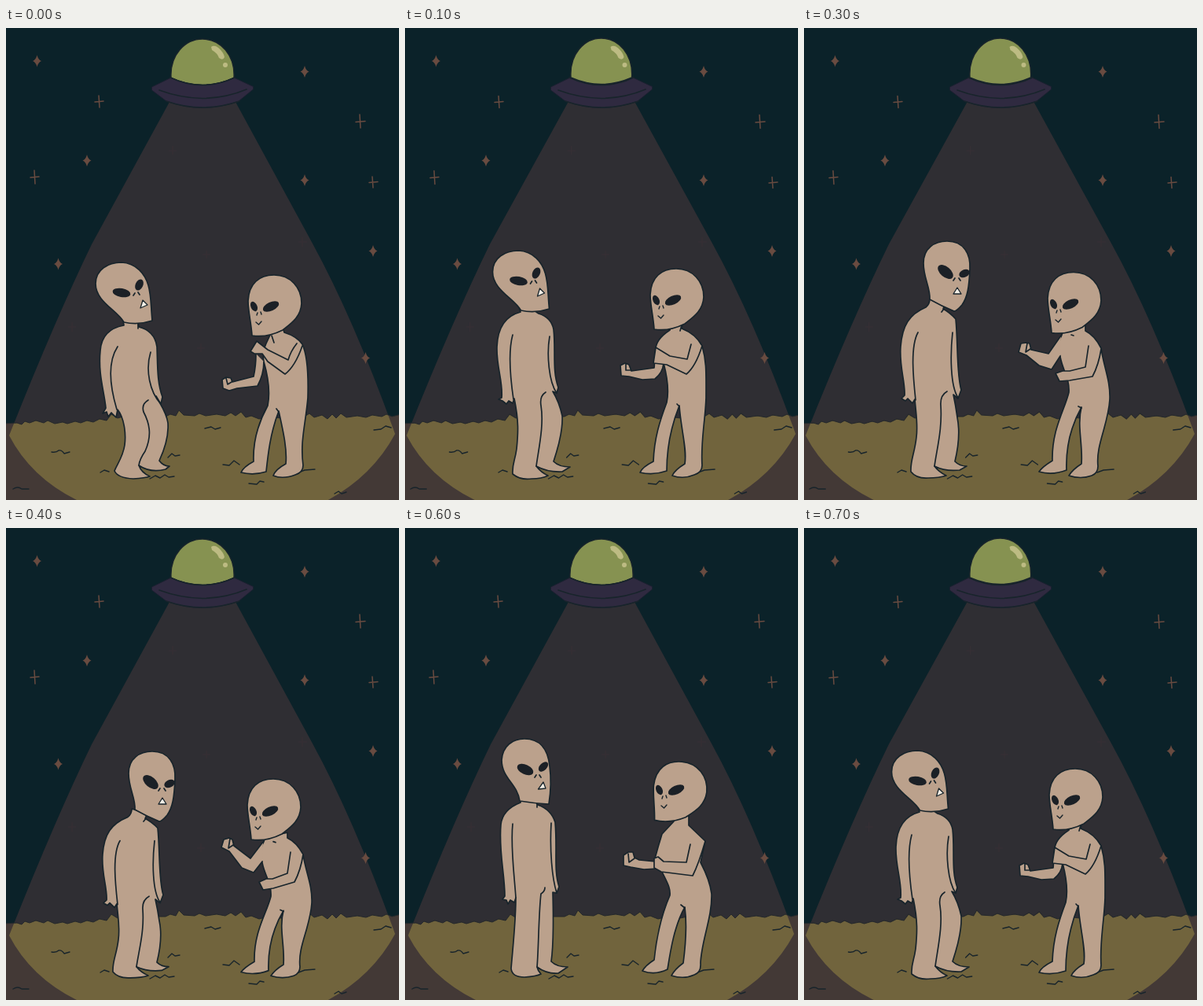
These frames come from a looping animation (500 px wide and 600 px high, 0.8 s). An HTML page:

```html
<!DOCTYPE html>
<html lang="en">
<head>
<meta charset="utf-8">
<title>Dancing aliens</title>
<style>
  html, body { margin: 0; width: 100%; height: 100%; overflow: hidden; background: #0b2229; }
  svg { display: block; width: 100%; height: 100%; }
  .line { fill: none; stroke: #18242b; stroke-width: 1.7; stroke-linecap: round; stroke-linejoin: round; }
  .skin { fill: #bba18c; stroke: #18242b; stroke-width: 1.7; stroke-linecap: round; stroke-linejoin: round; }
  .skin, .line { vector-effect: non-scaling-stroke; }
  .thin { stroke-width: 1.4; }
  .eye { fill: #1b2026; }
  .mouth { fill: #f4efe6; stroke: #18242b; stroke-width: 1.3; stroke-linejoin: round; }
  .star { fill: #694b40; }
  .cross { fill: none; stroke: #694b40; stroke-width: 1.5; stroke-linecap: round; }
  .faint { fill: none; stroke: #352f34; stroke-width: 1.6; }

  .pose, .view { visibility: hidden; animation: 800ms step-end infinite; }
  .low-l { animation-name: low-l; }
  .mid-l { animation-name: mid-l; }
  .high { animation-name: high; }
  .mid-r { animation-name: mid-r; }
  .low-r { animation-name: low-r; }
  .view { animation-duration: 200ms; }
  .one { animation-name: one; }
  .two { animation-name: two; }
  @keyframes low-l { 0% { visibility: visible } 12.5%, 100% { visibility: hidden } }
  @keyframes mid-l { 0%, 25% { visibility: hidden } 12.5%, 87.5% { visibility: visible } 100% { visibility: hidden } }
  @keyframes high { 0%, 37.5%, 87.5%, 100% { visibility: hidden } 25%, 75% { visibility: visible } }
  @keyframes mid-r { 0%, 50%, 75%, 100% { visibility: hidden } 37.5%, 62.5% { visibility: visible } }
  @keyframes low-r { 0%, 62.5%, 100% { visibility: hidden } 50% { visibility: visible } }
  @keyframes one { 0% { visibility: visible } 50%, 100% { visibility: hidden } }
  @keyframes two { 0% { visibility: hidden } 50%, 100% { visibility: visible } }
</style>
</head>
<body>
<svg viewBox="0 0 500 600" preserveAspectRatio="none">
  <defs>
    <path id="beam" d="M208 94 L109 275 Q62 372 4 518 Q32 572 92 601 H408 Q466 570 495 516 Q443 371 390 274 L292 94 Z"/>
    <path id="ground" d="M-3 503 L14 502 L20 504 L24 500 L30 502 L38 499 L48 502 L53 499 L62 503 L72 501 L78 503 L88 500 L95 502 L103 499 L111 501 L119 497 L128 499 L134 491 L142 496 L152 493 L165 496 L178 493 L190 494 L203 494 L209 491 L216 493 L220 486 L226 492 L240 493 L246 490 L254 493 L268 491 L279 493 L286 489 L292 493 L299 488 L305 495 L312 493 L322 497 L334 494 L350 496 L364 493 L378 495 L386 490 L392 495 L402 492 L409 497 L415 491 L420 496 L426 490 L433 495 L447 493 L458 495 L466 492 L478 494 L484 491 L491 494 L503 491 V603 H-3 Z"/>
    <clipPath id="lit"><use href="#beam"/></clipPath>
    <path id="tufts" class="line thin" d="M58 539 Q64 540 67 537 Q71 536 74 541 L81 539 M253 509 L261 507 L266 510 L273 508 M206 546 L211 541 L215 544 L221 543 M183 573 L190 569 L196 572 L202 568 L207 571 L214 570 M120 565 L125 562 L131 564 M276 555 L284 556 L290 550 L297 555 M309 579 L319 580 L323 576 L328 577 M372 565 L380 562 L393 561 M468 511 L477 510 L483 506 L490 508 M418 592 L423 589 L427 592 L433 590 M9 586 Q15 582 20 586 L29 586"/>

    <g id="scene">
      <use href="#beam" fill="#2f2e33"/>
      <path class="faint" d="M212 150 V161 M207 156 H217 M255 283 V293 M250 288 H260 M377 266 V278 M372 272 H383 M84 374 V386 M79 380 H89 M248 401 V412 M243 407 H253"/>
      <use href="#ground" fill="#433936" stroke="#26292c"/>
      <g clip-path="url(#lit)"><use href="#ground" fill="#71643d" stroke="#26292c"/></g>
      <use href="#tufts"/>
    </g>
    <path id="spark" d="M0 -7.5 Q1.5 -1.5 5.5 0 Q1.5 1.5 0 7.5 Q-1.5 1.5 -5.5 0 Q-1.5 -1.5 0 -7.5 Z"/>
    <g id="sparks" class="star">
      <use href="#spark" x="39.500" y="42"/><use href="#spark" x="380" y="55.500"/>
      <use href="#spark" x="103" y="168.500"/><use href="#spark" x="380" y="193.500"/>
      <use href="#spark" x="467" y="283.500"/><use href="#spark" x="66.500" y="300"/>
      <use href="#spark" x="457.500" y="419.500"/>
    </g>
    <path id="crosses" class="cross" d="M118 86 L119 101 M113 94 L124 93 M450 110 L451 127 M445 119.500 L457 118.500 M36 181 L37 198 M31 190 L42 189 M466 189 L467 203 M462 196.500 L473 195.500"/>
    <g id="saucer">
      <path d="M185.500 75 L210 63 Q250 82 290 63 L314.500 74.500 V78 L296 93 Q250 110 204 93 L185.500 79 Z" fill="#2f2a40" stroke="#1b2030" stroke-width="1"/>
      <path class="line" d="M195 79 Q222 89 250 89.500 Q280 89 306 78 M204 93 Q250 109 297 93 M209 63 Q250 82 291 63"/>
    </g>
    <path id="dome" d="M210 64 C208 34 228 14 250 14 C273 14 292 35 290 64 Q250 81 210 64 Z" fill="#869251" stroke="#18242b" stroke-width="1.5"/>
    <g id="shine" fill="#bdbb83">
      <path d="M261 24 Q265 21 270 25 Q277 31 278 37 Q276 42 271 38 Q269 32 262 28 Z"/>
      <circle cx="279" cy="47" r="3"/>
    </g>

    <g id="head-l">
      <path class="skin" d="M150 374 C142 359 114 348 114 325 C114 307 130 298 147 298 C166 299 177 313 181 327 C185 341 184 352 186 372 Q168 378 150 374 Z"/>
      <ellipse class="eye" cx="147" cy="336.500" rx="11.500" ry="5.500" transform="rotate(10 147 336.500)"/>
      <ellipse class="eye" cx="169.500" cy="326.500" rx="4.800" ry="7.500" transform="rotate(25 169.500 326.500)"/>
      <path class="line" d="M162 340 L164 337 M168 336 L170 339"/>
      <path class="mouth" d="M171 356 L174 346 L180 352 Z"/>
    </g>
    <g id="head-lr">
      <path class="skin" d="M160 345 C161 330 152 318 152 299 C152 280 166 271 182 271 C204 271 212 288 211 306 C210 330 208 342 201 352 Q194 360 191 360 Q174 353 160 345 Z"/>
      <ellipse class="eye" cx="180" cy="310" rx="11.500" ry="6.500" transform="rotate(40 180 310)"/>
      <ellipse class="eye" cx="204" cy="312" rx="7" ry="4.800" transform="rotate(-25 204 312)"/>
      <path class="line" d="M190 321 L192 318 M197 318 L199 321"/>
      <path class="mouth" d="M190 338 L195 330 L200 338 Z"/>
    </g>
    <g id="body-lr">
      <path class="skin" d="M160 344 Q160 351 155 355 C134 364 125 378 123 405 C121 430 129 450 128 467 L124 471 L129 474 L132 471 L138 477 L141 472 C143 495 145 505 143 520 C141 540 135 550 136 564 Q143 573 158 572 Q172 572 181 569 Q171 564 166 557 Q180 564 198 562 L207 557 Q198 557 192 551 C197 530 198 510 195 495 Q193 480 190 466 L196 471 L200 460 C194 440 196 400 193 370 Q186 362 177 357 L180 350 Z"/>
      <path class="line" d="M145 387 C135 405 139 445 142 473 M189 387 C186 415 186 455 196 470 M182 462 Q173 467 174 480 C176 510 169 535 166 557 M178 357 L175 361"/>
    </g>

    <path id="skull-r" class="skin" d="M313 391 C312 375 308 360 308 347 C309 325 322 314 341 314 C362 314 376 330 376 350 C375 368 362 376 352 384 Q332 394 313 391 Z"/>
    <g id="face-r">
      <ellipse class="eye" cx="315.500" cy="354" rx="4" ry="6.500" transform="rotate(-25 315.500 354)"/>
      <ellipse class="eye" cx="337" cy="354" rx="11" ry="5.500" transform="rotate(-25 337 354)"/>
      <path class="line thin" d="M319 365 L320 362 M324 361 L325 364 M318 374 L321.500 377 L325 373"/>
    </g>
    <g id="body-rr">
      <path class="skin" d="M330 384 L328 390 Q321 404 326 418 C329 435 338 445 337 463 C332 485 315 510 316 550 Q303 558 299 564 Q316 569 334 562 C333 535 339 507 353 482 C347 505 355 530 353 554 Q342 561 337 569 Q352 574 366 569 Q374 566 374 557 C371 530 387 505 389 472 C390 448 381 430 378 407 Q370 391 358 385 L358 378 Z"/>
      <path class="line" d="M349 481 L353 483 M340 390 L343 391"/>
    </g>
  </defs>

  <rect width="500" height="600" fill="#0b2229"/>

  <g class="view one">
    <use href="#scene"/>
    <use href="#sparks"/><use href="#crosses"/>
    <use href="#dome"/><use href="#saucer"/><use href="#shine"/>
  </g>
  <g class="view two">
    <use href="#scene" transform="translate(-2 0) scale(1.008 1)"/>
    <use href="#sparks"/>
    <use href="#crosses" x="1" y=".5"/>
    <use href="#dome" transform="translate(7.500 -1) scale(.969 1)"/>
    <use href="#saucer"/><use href="#shine" x=".5"/>
  </g>

  <g class="pose low-l">
    <path class="skin" d="M149 372 L150 378 Q122 383 120 410 C117 440 125 462 127 483 L123 490 L128 488 L130 494 L134 489 L140 495 L142 485 C150 495 153 515 151 530 C149 545 141 555 138 563 Q142 572 162 573 Q177 572 183 570 Q172 565 169 556 Q184 566 203 561 L208 557 Q200 557 195 550 C202 535 207 517 206 502 C204 488 196 478 191 468 L197 478 L199 469 C192 450 193 430 192 405 Q189 385 169 380 L168 374 Z"/>
    <path class="line" d="M142 405 C129 425 132 455 141 485 M184 412 C177 435 183 463 197 478 M181 473 Q172 478 175 488 C184 505 185 520 177 538 Q170 548 169 556 M168 376 L168 382"/>
    <use href="#head-l"/>
    <path class="skin" d="M338 386 L331 401 Q326 412 328 424 C334 445 336 465 333 480 C322 500 314 525 315 551 Q302 558 299 565 Q315 569 331 564 C333 545 336 515 347 487 C352 510 358 535 356 554 Q343 561 340 569 Q352 574 368 568 Q378 565 378 556 C374 525 381 505 384 470 C385 435 383 415 377 402 Q370 392 354 387 L352 380 Z"/>
    <path class="line" d="M344 484 L347 488 M338 391 L341 400"/>
    <path class="skin" d="M318 414 Q318 430 315 443 L288 450 L286 445 L280 444 L275 447 L276 458 L284 461 L294 458 L320 455 Q328 440 328 424"/>
    <path class="line" d="M280 445 L282 453 L287 450"/>
    <path class="skin" d="M370 401 Q362 411 359 422 L333 409 L319 398 L311 411 L316 414 L326 414 L333 424 L355 440 Q368 430 377 404"/>
    <use href="#skull-r"/><use href="#face-r"/>
  </g>

  <g class="pose mid-l">
    <path class="skin" d="M145 356 L147 361 C128 366 118 380 117 405 C116 430 125 450 123 470 L119 472 L124 474 L129 478 L132 474 L137 477 L139 471 C145 500 144 515 142 535 C140 550 136 555 137 567 Q147 575 161 573 Q174 573 182 569 Q173 565 167 557 Q182 565 200 564 L210 558 Q196 558 189 551 C196 530 201 510 200 493 Q196 475 188 462 L193 464 L195 457 C187 435 192 410 189 383 Q186 368 170 363 L164 359 Z"/>
    <path class="line" d="M137 390 C131 412 134 445 138 472 M184 392 C180 415 183 450 193 464 M179 463 Q171 468 173 480 C177 505 170 535 167 557"/>
    <use href="#head-l" x="-2.500" y="-15"/>
    <path class="skin" d="M338 378 L337 384 Q317 397 319 412 L329 426 C334 445 336 462 333 476 C324 500 317 522 316 551 Q302 558 299 565 Q316 569 333 563 C333 540 337 510 349 480 C351 510 359 535 356 554 Q343 562 340 569 Q354 574 368 568 Q378 565 378 556 C376 525 382 500 383 470 C383 440 384 425 378 404 Q370 389 352 382 L353 376 Z"/>
    <path class="line" d="M346 478 L349 481 M352 378 L350 385"/>
    <path class="skin" d="M318 420 L317 432 L288 436 L285 428 L280 426 L274 429 L275 442 L285 443 L302 447 L318 446 Q328 438 329 426"/>
    <path class="line" d="M281 427 L281 435 L287 435"/>
    <path class="skin" d="M364 402 L359 421 L337 417 L319 406 L316 426 L325 427 L333 428 L358 440 Q370 430 378 404"/>
    <use href="#skull-r" x="4" y="-8"/><use href="#face-r" x="4" y="-8"/>
  </g>

  <g class="pose high">
    <path class="skin" d="M147 345 L147 349 Q124 358 122 377 C119 410 127 440 127 468 L124 472 L129 473 L131 478 L134 473 L139 476 L141 470 C141 500 137 535 135 560 Q136 571 152 571 Q167 570 173 567 Q169 563 168 558 Q180 567 195 566 L207 558 Q193 558 186 551 C189 530 189 500 188 463 L193 464 L196 456 C189 435 194 410 191 374 Q186 358 169 352 L166 348 Z"/>
    <path class="line" d="M137 376 C134 405 139 440 141 470 M186 375 C184 410 187 445 193 464 M178 457 Q178 462 173 465 C170 490 170 535 168 558"/>
    <path class="skin" d="M146 347 C143 325 123 318 123 295 C124 277 137 268 152 268 C172 268 182 282 184 303 Q187 325 183 351 Q164 350 146 347 Z"/>
    <ellipse class="eye" cx="153" cy="307" rx="11" ry="6.200" transform="rotate(25 153 307)"/>
    <ellipse class="eye" cx="176" cy="303.500" rx="7.500" ry="4.500" transform="rotate(-45 176 303.500)"/>
    <path class="line" d="M165 317 L167 314 M171 314 L173 317 M168 351 L168 355"/>
    <path class="mouth" d="M169.500 332 L176 323 L179 331 Z"/>
    <path class="skin" d="M342 368 L342 373 L327 389 Q322 405 318 420 L327 437 C333 450 338 457 337 467 C327 490 320 520 317 549 Q306 556 302 563 Q318 569 334 561 C338 535 343 505 356 482 C359 505 357 530 354 553 Q343 561 339 569 Q355 574 368 568 Q377 565 376 553 C377 525 391 495 390 465 Q388 448 376 425 L382 398 L361 378 L361 366 Z"/>
    <path class="line" d="M351 479 L356 483"/>
    <path class="skin" d="M319 424 L298 422 L292 419 L290 412 L284 412 L278 416 L278 429 L287 431 L304 434 L320 433"/>
    <path class="line" d="M284 414 L285 425 L292 420"/>
    <path class="skin" d="M363 402 L358 425 L329 424 L322 418 L317 420 L317 432 L326 437 L366 442 Q374 426 382 398"/>
    <use href="#skull-r" transform="translate(8 -17) rotate(5 342 350)"/><use href="#face-r" x="8" y="-21"/>
  </g>

  <g class="pose mid-r">
    <use href="#body-lr"/><use href="#head-lr"/>
    <use href="#body-rr"/>
    <path class="skin" d="M327 391 L311 414 L289 409 L287 401 L283 400 L276 401 L273 412 L283 416 L299 429 L315 434 L326 417"/>
    <path class="line" d="M284 401 L282 412 L288 408"/>
    <path class="skin" d="M362 404 L358 431 L338 436 L329 436 L320 439 L325 449 L338 448 L367 443 Q375 428 378 408"/>
    <use href="#skull-r" x="2" y="-3.500"/><use href="#face-r" x="2" y="-3"/>
  </g>

  <g class="pose low-r">
    <use href="#body-lr" transform="translate(0 33) scale(1 .942)"/>
    <use href="#head-lr" x="4" y="13"/>
    <use href="#body-rr" transform="translate(0 27) scale(1 .953)"/>
    <path class="skin" d="M327 399 L311 420 L290 404 L288 396 L284 394 L277 396 L274 406 L284 411 L300 432 L315 438 L326 424"/>
    <path class="line" d="M285 395 L283 407 L289 403"/>
    <path class="skin" d="M362 412 L358 439 L339 446 L331 446 L322 450 L327 460 L340 458 L367 450 Q375 435 378 415"/>
    <use href="#skull-r" x="-1" y="5"/><use href="#face-r" x="-1" y="6"/>
  </g>
</svg>
</body>
</html>
```
